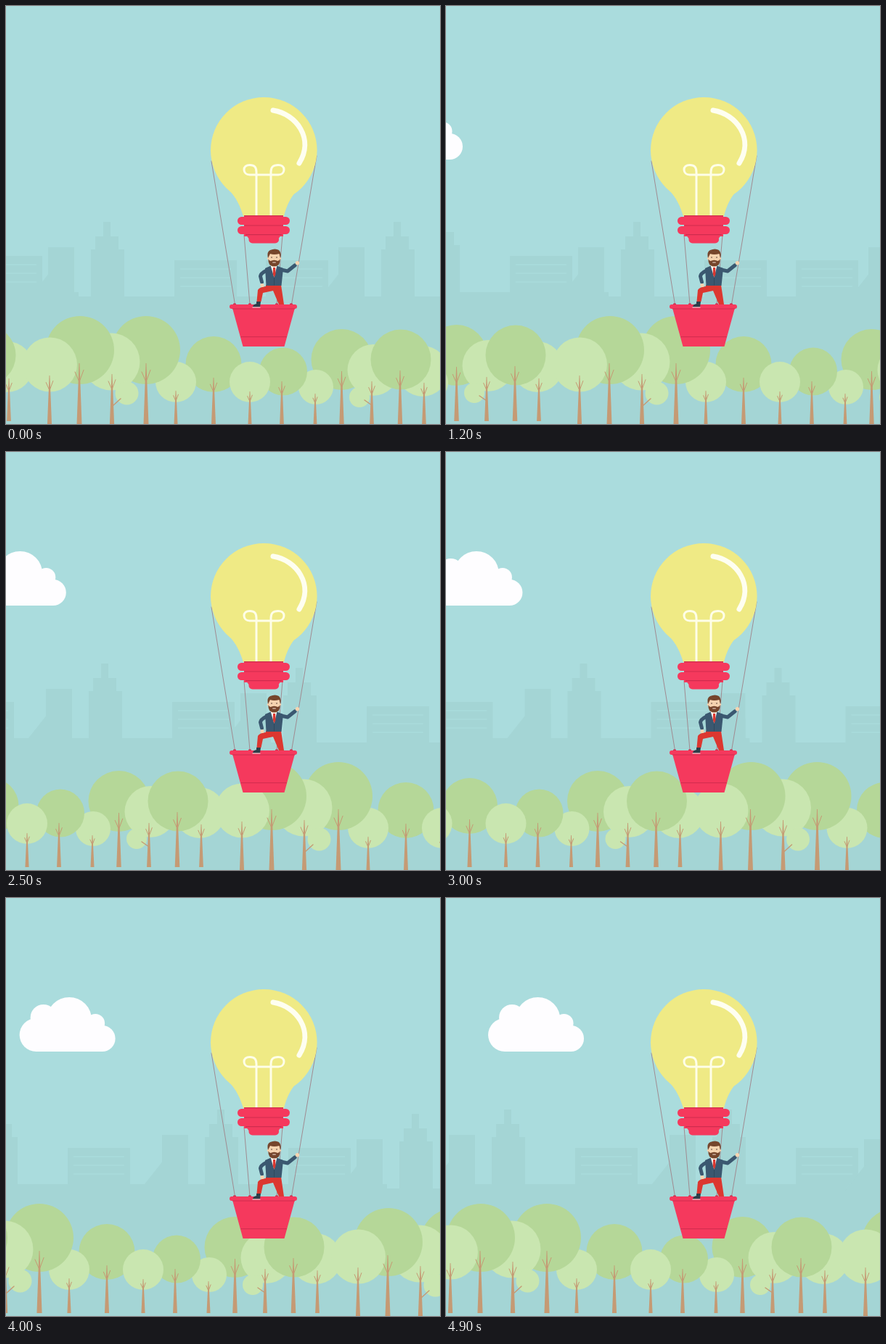
Recreate the animation shown at these times as an HTML page with a canvas. Size 598 by 577 pixels, loop 5 s.

```html
<!DOCTYPE html>
<html lang="en">
<head>
<meta charset="utf-8">
<title>Light bulb balloon</title>
<style>
html, body { margin: 0; width: 100%; height: 100%; overflow: hidden; background: #aadcdd; }
canvas { display: block; width: 598px; height: 577px; }
</style>
</head>
<body>
<canvas id="stage" width="598" height="577"></canvas>
<script>
const ctx = document.getElementById('stage').getContext('2d');
const W = 598, H = 577, LOOP = 5000, STEP = 100, SPAN = 572;
const SKY = '#aadcdd', CITY = '#a4d5d5', DARK = '#b5d798', LIGHT = '#c9e6b0', BARK = '#c59a74';
const RED = '#f5395d', DEEP = '#cf2c4e', SKIN = '#f5d3b0', HAIR = '#75452c';
const NAVY = '#3b5870', PANTS = '#dc3730';

// time in ms, scenery offset in px
const track = [[0, 60], [1200, 184], [1800, 250], [2500, 325], [3500, 432], [4000, 485], [4900, 578]];

// trunk x, crown offset, crown y, radius, tone, trunk top; back to front
const trees = [
  [516, -2, 498, 35, LIGHT, 514],
  [402.5, 0, 482, 42, DARK, 498],
  [444, 2, 496.5, 35.5, LIGHT, 512],
  [483, 1, 482, 41.5, DARK, 497],
  [366, 1, 520, 24, LIGHT, 529],
  [320, 2, 498.5, 33, DARK, 512],
  [226, 0, 488.5, 38.5, DARK, 507],
  [276, 0, 513, 28, LIGHT, 526],
  [174, 0, 513, 28, LIGHT, 525],
  [133, 0, 469, 47, DARK, 487],
  [86, -1, 485, 39.5, LIGHT, 502],
  [41, 1, 469, 47, DARK, 487],
  [0, 0.5, 489, 37.5, LIGHT, 504]
];

function offsetAt(t) {
  let i = 1;
  while (i < track.length - 1 && t > track[i][0]) i++;
  const [t0, x0] = track[i - 1], [t1, x1] = track[i];
  return x0 + (x1 - x0) * (t - t0) / (t1 - t0);
}

function disc(x, y, r, color) {
  ctx.fillStyle = color;
  ctx.beginPath();
  ctx.arc(x, y, r, 0, Math.PI * 2);
  ctx.fill();
}

function box(x, y, w, h, color, r = 0) {
  ctx.fillStyle = color;
  ctx.beginPath();
  ctx.roundRect(x, y, w, h, r);
  ctx.fill();
}

function fill(d, color) {
  ctx.fillStyle = color;
  ctx.fill(new Path2D(d));
}

function line(d, color, width, cap = 'round') {
  ctx.strokeStyle = color;
  ctx.lineWidth = width;
  ctx.lineCap = cap;
  ctx.lineJoin = 'round';
  ctx.stroke(new Path2D(d));
}

function wideBlock(x) {
  box(x, 345, 86, 60, CITY);
  for (let y = 356; y < 392; y += 12) box(x + 8, y, 70, 2, '#a8dada');
}

function cityBlock(x) {
  box(x - 2, 327, 36, 80, CITY);
  fill(`M${x - 30} 400L${x} 362H${x + 34}V400Z`, CITY);
  box(x + 57, 330, 46, 75, CITY);
  box(x + 63, 312, 32, 20, CITY);
  box(x + 74, 292, 10, 22, CITY);
  wideBlock(x + 172);
}

function city(x, parts) {
  box(x - 20, 395, SPAN + 60, 200, CITY);
  parts.forEach(p => cityBlock(x + p));
}

function trunk(x, top) {
  const base = 573, h = base - top, w = 1.4 + h / 40;
  fill(`M${x - 0.4} ${top}H${x + 0.4}L${x + w} ${base}H${x - w}Z`, BARK);
  const fork = top + h * 0.3, reach = h * 0.07;
  line(`M${x - reach} ${fork - h * 0.16}L${x} ${fork}L${x + reach} ${fork - h * 0.19}`, BARK, 1);
}

function forest(x) {
  for (const [tx, dx, y, r, tone] of trees) disc(x + tx + dx, y, r, tone);
  disc(x + 106.5, 528.5, 16, LIGHT);
  disc(x + 427, 534, 14, LIGHT);
  line(`M${x + 87} 546L${x + 98} 536M${x + 444} 545L${x + 434} 538`, BARK, 1.4);
  for (const t of trees) trunk(x + t[0], t[5]);
}

function lowered(draw) {
  ctx.save();
  ctx.translate(0, 6);
  draw();
  ctx.restore();
}

function cloud(right) {
  const x = right - 132, c = '#fefdff';
  disc(x + 23, 189, 23, c);
  disc(x + 33, 165, 18, c);
  disc(x + 68.5, 168, 31, c);
  disc(x + 104.5, 173, 13, c);
  disc(x + 114, 194, 18, c);
  box(x + 23, 175, 91, 37, c);
}

function bulb() {
  const glass = '#efea85';
  disc(355.3, 199.3, 73.3, glass);
  fill('M296 242C312 258 320 267 327 290H383C389 267 397 257 414 242Z', glass);
  line('M368 144C400 149 425 183 404 217', '#fefef0', 7);
  line('M345 290V229C345 222 342 219.5 336 219.5C331 219.5 328 222 328 226C328 230 331 233 336 233H375' +
       'C380 233 383 230 383 226C383 222 380 219.5 375 219.5C368 219.5 365 222 365 229V290', '#fefee8', 3);
  box(328, 289, 54, 29, RED);
  box(319, 291, 72, 11, RED, 5.5);
  box(319, 304, 72, 11, RED, 5.5);
  fill('M330 315H380L374 323H336Z', RED);
  box(334.5, 317, 41.5, 10.5, RED, 5);
  line('M328 289.7H382M328 303H382M330 315.7H380', DEEP, 1.2, 'butt');
}

function ropes() {
  line('M283 214L315.5 412M428 207L393.5 412M328 316L336 412M381 316L373 412', '#a08b91', 1);
}

function basket() {
  for (const x of [315, 336, 373, 393]) disc(x, 412.5, 2.3, DEEP);
  fill('M312 417H398L383.5 470H326.5Z', RED);
  box(308, 412, 93, 6, RED, 3);
  line('M312 418H398M323.5 456.7H387', DEEP, 1, 'butt');
}

function man() {
  // legs and shoe
  fill('M358 385H379L383 412H376L368 393L354 396L351.5 408H345.5L347 392Q349 388 358 387Z', PANTS);
  fill('M345 408H351L350 415.5H340Q340 412 345 411Z', '#2d3e4a');
  line('M340 416H350', '#eef1ee', 1.2);
  // arms
  line('M359 365Q351 369 350.5 373L352.5 381', NAVY, 5);
  disc(353, 385.5, 2.6, SKIN);
  line('M379 364L388 366L398 358', NAVY, 5.2);
  disc(401.5, 354.8, 2.7, SKIN);
  // torso
  fill('M357 362L365 358.5H373L382 362L379.5 386H358.5Z', NAVY);
  fill('M364.5 358H373.5L369.5 375Z', '#f7f4ee');
  fill('M368 361H371L371.5 370L369.6 374.5L367.8 370Z', PANTS);
  line('M369.5 375V385', '#2d4558', 0.8);
  // head
  box(366, 354, 7, 6, SKIN, 2);
  box(361.5, 338, 16, 19, SKIN, 7);
  disc(361.5, 348.5, 1.7, SKIN);
  disc(377.5, 348.5, 1.7, SKIN);
  fill('M361 348Q359 339 364 337Q371 334 376 337Q380 341 378 348L376.5 342Q369 344 364 342Z', HAIR);
  fill('M361.5 349Q363 353 366 351.5Q369.5 350 373 351.5Q376 353 377.5 349Q378.5 359 369.5 359.5Q360.5 359 361.5 349Z', HAIR);
  line('M367.7 354H371.3', '#f4e6d8', 1.2);
  disc(366, 347, 0.8, '#4a342b');
  disc(373, 347, 0.8, '#4a342b');
}

function draw(now) {
  const t = Math.floor((now % LOOP) / STEP) * STEP;
  const x = offsetAt(t);
  box(0, 0, W, H, SKY);
  city(x - SPAN, [0, 304]);
  lowered(() => {
    city(x, [0, 400]);
    wideBlock(x + 298);
  });
  cloud(23 + 0.424 * (x - 184));
  forest(x - SPAN);
  lowered(() => forest(x));
  ropes();
  bulb();
  basket();
  man();
}

const start = performance.now();
function tick() {
  draw(performance.now() - start);
  requestAnimationFrame(tick);
}
tick();
</script>
</body>
</html>
```
